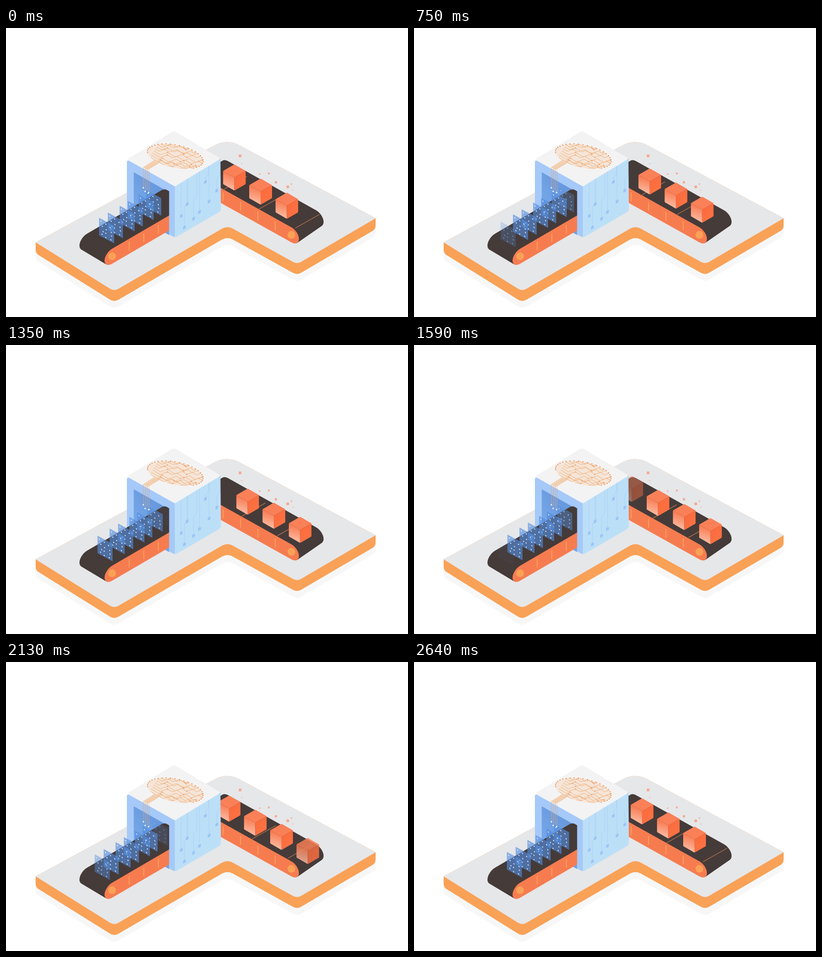
These frames come from a looping animation (881x635 px, 2.67 s). An HTML page with a canvas:

```html
<!DOCTYPE html>
<html lang="en">
<head>
<meta charset="utf-8">
<style>
html, body { margin: 0; width: 100%; height: 100%; overflow: hidden; background: #fff; }
canvas { display: block; }
</style>
</head>
<body>
<canvas id="stage" width="881" height="635"></canvas>
<script>
const ctx = document.getElementById('stage').getContext('2d');
const LOOP = 2670;
const ORANGE = '#f9a157', CORAL = '#f67c50', FRAME = '#a5c9f8';
const clamp = v => Math.max(0, Math.min(1, v));

function seeded(seed) {
  return () => (seed = (seed * 16807) % 2147483647) / 2147483647;
}

// Closed polygon; a third value in a point rounds that corner.
function trace(points) {
  const n = points.length, last = points[n - 1], first = points[0];
  ctx.beginPath();
  ctx.moveTo((last[0] + first[0]) / 2, (last[1] + first[1]) / 2);
  points.forEach(([x, y, r = 0], i) => {
    const next = points[(i + 1) % n];
    ctx.arcTo(x, y, next[0], next[1], r);
  });
  ctx.closePath();
}
function poly(points, fill) {
  trace(points);
  ctx.fillStyle = fill;
  ctx.fill();
}
function line(points, color, width = 1.1) {
  ctx.beginPath();
  points.forEach(([x, y]) => ctx.lineTo(x, y));
  ctx.strokeStyle = color;
  ctx.lineWidth = width;
  ctx.stroke();
}
function dot(x, y, r, color) {
  ctx.beginPath();
  ctx.arc(x, y, r, 0, Math.PI * 2);
  ctx.fillStyle = color;
  ctx.fill();
}
function gradient(x0, y0, x1, y1, from, to) {
  const g = ctx.createLinearGradient(x0, y0, x1, y1);
  g.addColorStop(0, from);
  g.addColorStop(1, to);
  return g;
}
// Draws with x running along a slope and y staying vertical.
function skewed(x, y, slope, paint) {
  ctx.save();
  ctx.transform(1, slope, 0, 1, x, y);
  paint();
  ctx.restore();
}

function slab(drop, fill) {
  poly([[65, 471], [484, 243, 54], [810, 418], [810, 418 + drop, 14],
    [638, 519 + drop, 18], [485, 434 + drop, 24], [237, 578.5 + drop, 18], [65, 471 + drop, 14]], fill);
}
function platform() {
  slab(39, '#f7f7f7');
  slab(24, ORANGE);
  slab(0, '#e6e7e9');
}

// A capsule swept from the far side to the near side; (x, y) is the near roller.
function belt({ x, y, slope, length, dx, dy, notches }) {
  const r = 16.5, steps = 50;
  const capsule = fill => {
    ctx.beginPath();
    ctx.roundRect(Math.min(0, length) - r, -r, Math.abs(length) + 2 * r, 2 * r, r);
    ctx.fillStyle = fill;
    ctx.fill();
  };
  for (let i = steps; i > 0; i--) {
    skewed(x + dx * i / steps, y + dy * i / steps, slope, () => capsule('#453b39'));
  }
  skewed(x, y, slope, () => {
    capsule(CORAL);
    notches.forEach(n => line([[n, -9.5], [n, 9.5]], '#f9a95c', 1.6));
  });
  dot(x, y, 8.5, ORANGE);
}

function rightBelt(u) {
  const x = 625.5, y = 454.5, slope = 0.56;
  belt({ x, y, slope, length: -192.5, dx: 54, dy: -37.5,
    notches: [0, 1, 2, 3].map(i => -35.5 - 38 * i) });
  for (let i = 0; i < 3; i++) {
    const sx = 475 + 79.5 * (i + u), sy = 354 + (sx - 471) * 0.525;
    if (sx < 640) line([[sx, sy], [sx + 53, sy - 30]], '#a96d4c', 1.6);
  }
}
function leftBelt() {
  belt({ x: 232.5, y: 501.5, slope: -0.585, length: 162, dx: -55, dy: -33,
    notches: [0, 1, 2].map(i => 37.5 + 32 * i) });
}

function box(x, y, alpha) {
  ctx.save();
  ctx.globalAlpha = alpha;
  ctx.translate(x, y);
  trace([[0, 0, 4], [25, 14.5, 3], [25, 43.5, 3], [0, 58, 4], [-25, 43.5, 3], [-25, 14.5, 3]]);
  ctx.clip();
  poly([[0, 0], [25, 14.5], [0, 29], [-25, 14.5]], '#fa8058');
  poly([[-25, 14.5], [0, 29], [0, 58], [-25, 43.5]], gradient(-8, 20, -16, 52, '#f97a50', '#fcb9a0'));
  poly([[0, 29], [25, 14.5], [25, 43.5], [0, 58]], gradient(0, 29, 22, 45, '#fb6b3c', '#fc7244'));
  ctx.restore();
}
function boxes(u) {
  for (let i = -1; i < 3; i++) {
    const p = i + u;
    const alpha = clamp((p + 0.47) / 0.15) * clamp((2.93 - p) / 0.16);
    box(500.5 + 57.5 * p, 299.5 + 31 * p, alpha);
  }
}
function sparks() {
  ctx.fillStyle = '#f3ac97';
  [[513, 281, 6], [516.5, 298, 2], [556, 321, 3], [576, 319.5, 4], [591.5, 339, 5],
    [617.5, 349, 6], [625.5, 343, 3], [629, 356, 2]].forEach(([x, y, size]) =>
    ctx.fillRect(x - size / 2, y - size / 2, size, size));
}

function machineFront() {
  poly([[265, 289, 3], [371, 347], [371, 461, 3], [265, 402]], FRAME);
  poly([[280, 317], [357.5, 361], [357.5, 455], [280, 411]], gradient(280, 380, 340, 335, '#75a7e8', '#6595da'));
}

function panel(s) {
  const alpha = clamp((s + 0.42) / 0.3) * clamp((2.95 - s) / 0.5);
  if (!alpha) return;
  const x = 204 + 46.5 * s - 1.6 * s * s;
  const rand = seeded(77);
  ctx.globalAlpha = alpha;
  skewed(x, 417 - (x - 204) * 0.592, 0.54, () => {
    ctx.fillStyle = 'rgba(84,142,222,0.63)';
    ctx.fillRect(0, 0, 33, 38.5);
    for (let i = 0; i < 12; i++) {
      dot(4 + (i % 3) * 10 + rand() * 5, 5 + Math.floor(i / 3) * 9 + rand() * 4, 1.2, '#f1f6ff');
    }
  });
  ctx.globalAlpha = 1;
}
function panels(u) {
  for (let i = 2; i >= -1; i--) {
    panel(i + 0.42 + u);
    panel(i + u);
  }
}

function circuits() {
  const ends = [[384, 413], [391, 438], [397, 387], [411, 419], [424, 404], [437, 338], [445, 381], [462, 357]];
  ends.forEach(([x, y], i) => {
    const jog = i % 2 ? 7 : 0, top = 347 - (x + jog - 371) * 0.6;
    const bend = top + (y - top) * 0.5;
    line([[x + jog, top], [x + jog, bend], [x, bend + jog * 1.3], [x, y]], '#a8d0f4', 1);
    skewed(x, y, -0.5, () => {
      ctx.fillStyle = '#9bc5f5';
      ctx.fillRect(-3, -3, 6, 6.5);
    });
  });
}

function brain() {
  const fill = '#f5e5d8', ink = '#f0b989', node = '#ef965d';
  const cx = 371, cy = 282, rx = 62, ry = 25, tilt = 0.2;
  const rim = a => [
    cx + rx * Math.cos(a) * Math.cos(tilt) - ry * Math.sin(a) * Math.sin(tilt),
    cy + rx * Math.cos(a) * Math.sin(tilt) + ry * Math.sin(a) * Math.cos(tilt)
  ];
  const rand = seeded(41);
  poly([[300, 306], [324, 290], [348, 290], [310, 312]], fill);
  for (let i = 0; i < 5; i++) {
    const o = i * 2.3;
    line([[301 + o, 307 + o * 0.5], [328 + o, 290 + o * 0.5], [330 + o * 2, 282 + o]], ink);
  }
  ctx.save();
  ctx.beginPath();
  ctx.ellipse(cx, cy, rx, ry, tilt, 0, Math.PI * 2);
  ctx.fillStyle = fill;
  ctx.fill();
  ctx.clip();
  // Parallel strands that alternate between the two floor directions.
  for (let i = 0; i < 13; i++) {
    let x = 306 + i * 3, y = 297 - i * 4.5;
    const path = [[x, y]];
    for (let k = 0; k < 9; k++) {
      const run = 8 + rand() * 9;
      x += run;
      y += run * (k % 2 ? -0.35 : 0.6);
      path.push([x, y]);
    }
    line(path, ink);
    for (let k = 2; k < 9; k += 3) dot(...path[k], 1.2, node);
  }
  ctx.restore();
  for (let i = 0; i < 26; i++) dot(...rim(Math.PI * (0.95 + i * 0.052)), 1.3, node);
}

function machineShell() {
  poly([[357.5, 339], [372, 347], [372, 461, 3], [357.5, 453]], FRAME);
  poly([[370, 347], [470, 286], [471, 402, 9], [370, 461, 2]], '#bcdff8');
  circuits();
  poly([[265, 289, 3], [368, 226, 9], [471, 287, 3], [370, 348, 2]], '#f3f3f4');
  brain();
  for (let i = 0; i < 4; i++) {
    const x = 301.5 + i * 4;
    line([[x, 307 + i * 2], [x, 350 + i * 4]], 'rgba(222,164,126,0.75)');
  }
  [[301, 351], [305, 359], [312.5, 361.5]].forEach(([x, y]) => dot(x, y, 1.6, '#fff'));
}

function draw(now) {
  const u = (now % LOOP) / LOOP;
  ctx.fillStyle = '#fff';
  ctx.fillRect(0, 0, 881, 635);
  platform();
  rightBelt(u);
  boxes(u);
  sparks();
  machineFront();
  leftBelt();
  panels(u);
  machineShell();
}

const start = performance.now();
function tick() {
  draw(performance.now() - start);
  requestAnimationFrame(tick);
}
tick();
</script>
</body>
</html>
```
